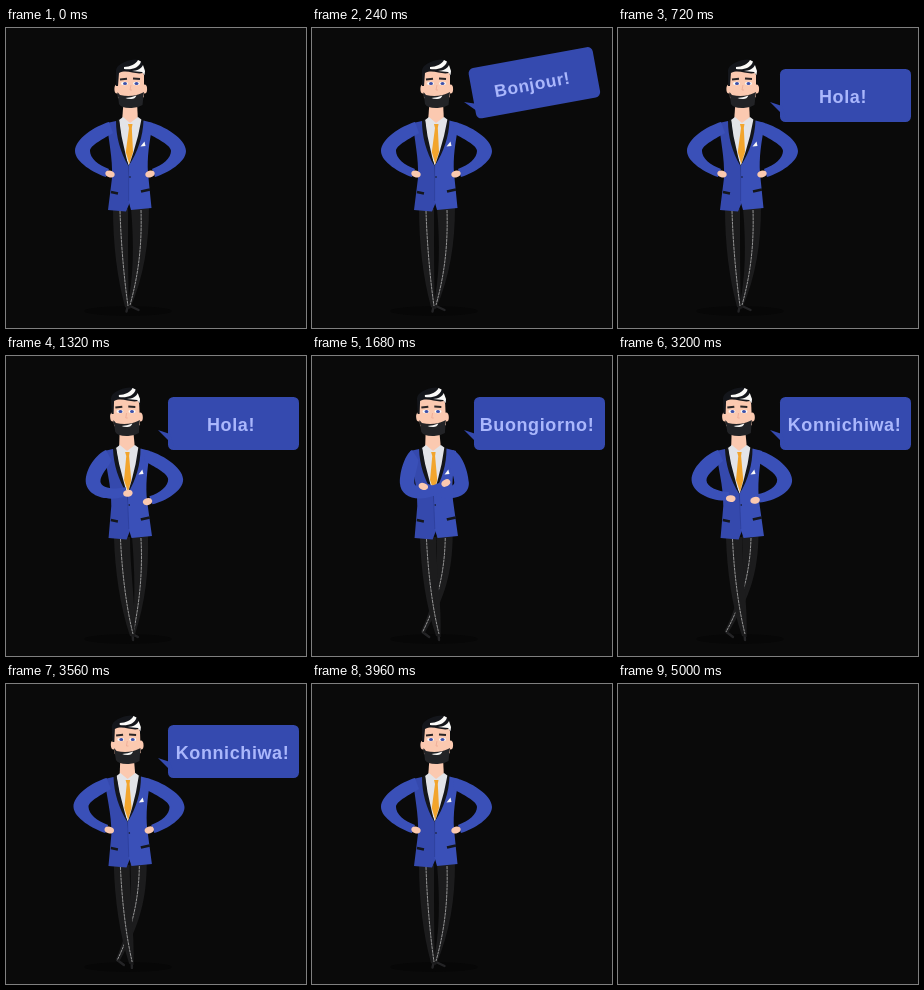
Animation, 300 px wide and 300 px high, one loop 5040 ms. Source, as an HTML page:

```html
<!DOCTYPE html>
<html lang="en">
<head>
<meta charset="utf-8">
<title>Greetings</title>
<style>
  html, body { margin: 0; width: 100%; height: 100%; overflow: hidden; background: #0a0a0a; }
  svg { display: block; width: 100%; height: 100%; }
  text { font: bold 18px "Liberation Sans", Arial, sans-serif; letter-spacing: .6px; fill: #aab7fc; text-anchor: middle; }
  .blue { fill: #3a50b8; }
  .deep { fill: #3549ad; }
  .dark { fill: #14161b; }
  .trouser { fill: #1c1c1d; }
  .skin { fill: #fbc9b0; }
  .white { fill: #fbfaf8; }
  .stitch { fill: none; stroke: #b4b4b4; stroke-width: .8; stroke-dasharray: 3 .6; }
  .shoe { fill: none; stroke: #242426; stroke-width: 2.4; stroke-linecap: round; }
  .pocket { stroke: #14161b; stroke-width: 2.8; }
  .brow { fill: none; stroke: #2a2526; stroke-width: 1.9; }
</style>
</head>
<body>
<svg viewBox="0 0 300 300">
  <g id="man">
    <ellipse cx="122" cy="283" rx="44" ry="5" fill="#070707"/>
    <path id="shoeR" class="shoe"/>
    <path id="legR" class="trouser"/>
    <path id="seamR" class="stitch"/>
    <path id="shoeL" class="shoe"/>
    <path id="legL" class="trouser"/>
    <path id="seamL" class="stitch"/>
    <g id="upper">
      <path class="skin" d="M117.500 74H131L132 94L124 99L116 94Z"/>
      <path fill="#e3e4e8" d="M113 92L117 89L124 95L132 89L136 92L131 120L123 138L116 120Z"/>
      <path fill="#f2a52d" d="M122 96H126.500L125.800 100L127 124L123.300 136L119.800 124L123 100Z"/>
      <path class="dark" d="M113 91L108 95L112 122L122.500 139L119.500 126L115.500 108ZM135.500 91L141 96L134 122L122.500 139L127.500 124L132 108Z"/>
      <path class="deep" d="M101 95L110 93C110 108 114 124 122.500 138L124 174L120 183.500L102 182L106 150C107 130 102 110 101 95Z"/>
      <path class="blue" d="M137.500 92.500L147 95C143 115 141 130 142 145L145.500 180L125 182L122.500 173V138C132 124 137 108 137.500 92.500Z"/>
      <path d="M122.600 138V173" stroke="#2c3d96" stroke-width=".7"/>
      <circle cx="124" cy="149" r=".8" class="dark"/>
      <path class="pocket" d="M105 164L112 165.500M135 163.500L144 161.500"/>
      <path class="white" d="M134.500 118.500L138.500 113.500L139.500 118Z"/>
      <path id="armR" class="blue"/>
      <path id="armL" class="blue"/>
      <ellipse id="handR" class="skin" rx="4.800" ry="3.400"/>
      <ellipse id="handL" class="skin" rx="4.800" ry="3.400"/>
      <ellipse class="skin" cx="111" cy="61" rx="2.600" ry="4.500"/>
      <ellipse class="skin" cx="138.500" cy="61" rx="2.600" ry="4.500"/>
      <path class="skin" d="M111 44Q124 38 138 43L138 69Q125 76 112 70Z"/>
      <path class="dark" d="M110 58V45C109 38 116 34 125 32C132 30 137 33 137 39C139 41 139.500 45 139 49L137 45C129 47 121 41 113 45L112 58Z"/>
      <path class="white" d="M118 39C124 39 130 36 132 32L135 33.500C133 40 126 42 118 41ZM126 43C131 43 136 40 137 37L139 43L138.500 47L136 44Z"/>
      <path fill="#222326" d="M111.500 64L114 67C122 69 130 68 136 65L138 64L136.500 77Q131 80.500 124 80Q115 80 113 76Z"/>
      <path class="white" d="M119.500 70Q125 69.800 130.500 67.500Q129 71 125 71Q121 71 119.500 70Z"/>
      <path d="M125 57L124 62H126" fill="none" stroke="#eda993" stroke-width=".8"/>
      <path class="brow" d="M114 51.500L121 50.800M127 50.500L134 51"/>
      <g id="eyes">
        <ellipse class="white" cx="118.500" cy="55.500" rx="3.400" ry="1.700"/>
        <ellipse class="white" cx="130.500" cy="55.500" rx="3.400" ry="1.700"/>
        <ellipse cx="119" cy="55.500" rx="2" ry="1.600" fill="#3d4fa8"/>
        <ellipse cx="130.500" cy="55.500" rx="2" ry="1.600" fill="#3d4fa8"/>
      </g>
    </g>
  </g>
  <g id="bubble" fill="#354aaf">
    <rect x="162" y="41" width="131" height="53" rx="5.500"/>
    <path d="M152 74L164 78L168 90Z"/>
    <text id="word" y="75"></text>
  </g>
</svg>
<script>
const LOOP = 5040, STEP = 40;
const el = {};
document.querySelectorAll('[id]').forEach(n => el[n.id] = n);

const words = [
  { text: 'Bonjour!', x: 225 },
  { text: 'Hola!', x: 225 },
  { text: 'Buongiorno!', x: 225 },
  { text: 'Nin Hao!', x: 228.5, thin: true },
  { text: 'Konnichiwa!', x: 226.5 }
];

// Each limb: standing pose first, crossed pose last.
const arms = {
  armL: ['M103 94C89 98 69 111 69 123C69 134 88 145 100 149L103 141C92 137 84 130 84 123C84 117 99 110 107 105Z',
         'M103 94C97 97 90 113 89.5 127C90 144 112 148 135 134L133 125C120 132 104 133 104 127C104 120 108 112 109 104Z'],
  armR: ['M142 94C158 97 180 111 180 123C180 134 162 145 149 149L146 141C157 137 165 130 165 123C165 117 150 110 141 105Z',
         'M144 94C151 97 155 113 155.5 127C156 144 130 148 109 134L111 125C122 132 141 133 141 127C141 120 139 112 137 104Z']
};
const hands = {
  handL: [[104, 146], [135.5, 127]],
  handR: [[144, 146], [108.5, 127]]
};
const left = {
  legL: ['M107 181L122 181C122 215 122 250 123 281L119 279C111 250 107 215 107 181Z',
         'M108 182L124 181C124 215 130 250 128.5 281L124 280C114 250 109 215 108 182Z'],
  seamL: ['M114 183C115 215 118 250 122 278', 'M114.5 183C116 215 120 250 127 278'],
  shoeL: ['M122 277L120.5 283.5', 'M126.5 277L127 284']
};
const right = {
  legR: ['M125 180L143 179C143 215 138 248 124 281L121 279C128 250 128 215 125 180Z',
         'M126 180L142 179C143 215 140 245 129 281L126 279C130 250 129 215 126 180Z',
         'M124 180L140.5 179C140 215 133 240 110 277L106.5 275C121 250 126 215 124 180Z'],
  seamR: ['M135 182C136 215 133 245 124 277', 'M135 182C137 215 134 245 128 277',
          'M133 182C132 215 125 245 108 276'],
  shoeR: ['M124 278L132.5 282', 'M127 278L132.5 281', 'M108.5 276L115 281']
};

const clamp = v => Math.max(0, Math.min(1, v));
const ease = (t, from, to) => {
  const p = clamp((t - from) / (to - from));
  return p * p * (3 - 2 * p);
};
const lerp = (a, b, p) => a + (b - a) * p;

function mix(a, b, p) {
  const goal = b.match(/[\d.]+/g);
  let i = 0;
  return a.replace(/[\d.]+/g, n => lerp(+n, +goal[i++], p).toFixed(2));
}

function setArm(side, p) {
  const arm = 'arm' + side, hand = 'hand' + side;
  el[arm].setAttribute('d', mix(...arms[arm], p));
  const [a, b] = hands[hand];
  const x = lerp(a[0], b[0], p);
  const y = lerp(a[1], b[1], p) + 3 * Math.sin(Math.PI * p);
  const turn = (side === 'L' ? 1 : -1) * lerp(15, -25, p);
  el[hand].setAttribute('transform', `translate(${x} ${y}) rotate(${turn})`);
}

function drawMan(t) {
  const back = ease(t, 3420, 3960);
  const lean = ease(t, 700, 1240) - back;
  const cross = ease(t, 1260, 1800) - back;
  const k = 0.04 * lean;

  el.man.style.display = t >= 5000 ? 'none' : '';
  el.upper.setAttribute('transform', `matrix(1 0 ${k} 1 ${-183 * k + 0.6 * lean} 0)`);
  setArm('L', ease(t, 1000, 1560) - ease(t, 2860, 3400));
  setArm('R', ease(t, 1250, 1800) - ease(t, 2860, 3320));
  for (const id in left) el[id].setAttribute('d', mix(...left[id], lean));
  for (const id in right) {
    const [stand, shift, crossed] = right[id];
    el[id].setAttribute('d', mix(mix(stand, shift, lean), crossed, cross));
  }

  const lid = Math.max(0, 1 - Math.abs(t - 4540) / 110);
  el.eyes.setAttribute('transform', `translate(0 ${55.5 * lid}) scale(1 ${1 - lid})`);
}

function drawBubble(t) {
  const p = clamp(t / 360), gone = clamp((t - 3580) / 280);
  const size = (1 - (1 - p) ** 3) * (1 - gone * gone);
  const turn = -12 * Math.sin(Math.PI * p);
  el.bubble.style.display = size > 0.001 ? '' : 'none';
  el.bubble.setAttribute('transform',
    `translate(152 74) rotate(${turn}) scale(${size}) translate(-152 -74)`);

  const w = words[Math.min(4, Math.floor(t / 720))];
  el.word.textContent = w.text;
  el.word.setAttribute('x', w.x);
  el.word.style.fontWeight = w.thin ? 'normal' : 'bold';
  el.word.style.fontStyle = w.thin ? 'italic' : 'normal';
}

const start = performance.now();
function tick() {
  const now = Math.max(0, performance.now() - start) % LOOP;
  const t = Math.floor(now / STEP) * STEP;
  drawMan(t);
  drawBubble(t);
  requestAnimationFrame(tick);
}
tick();
</script>
</body>
</html>
```
